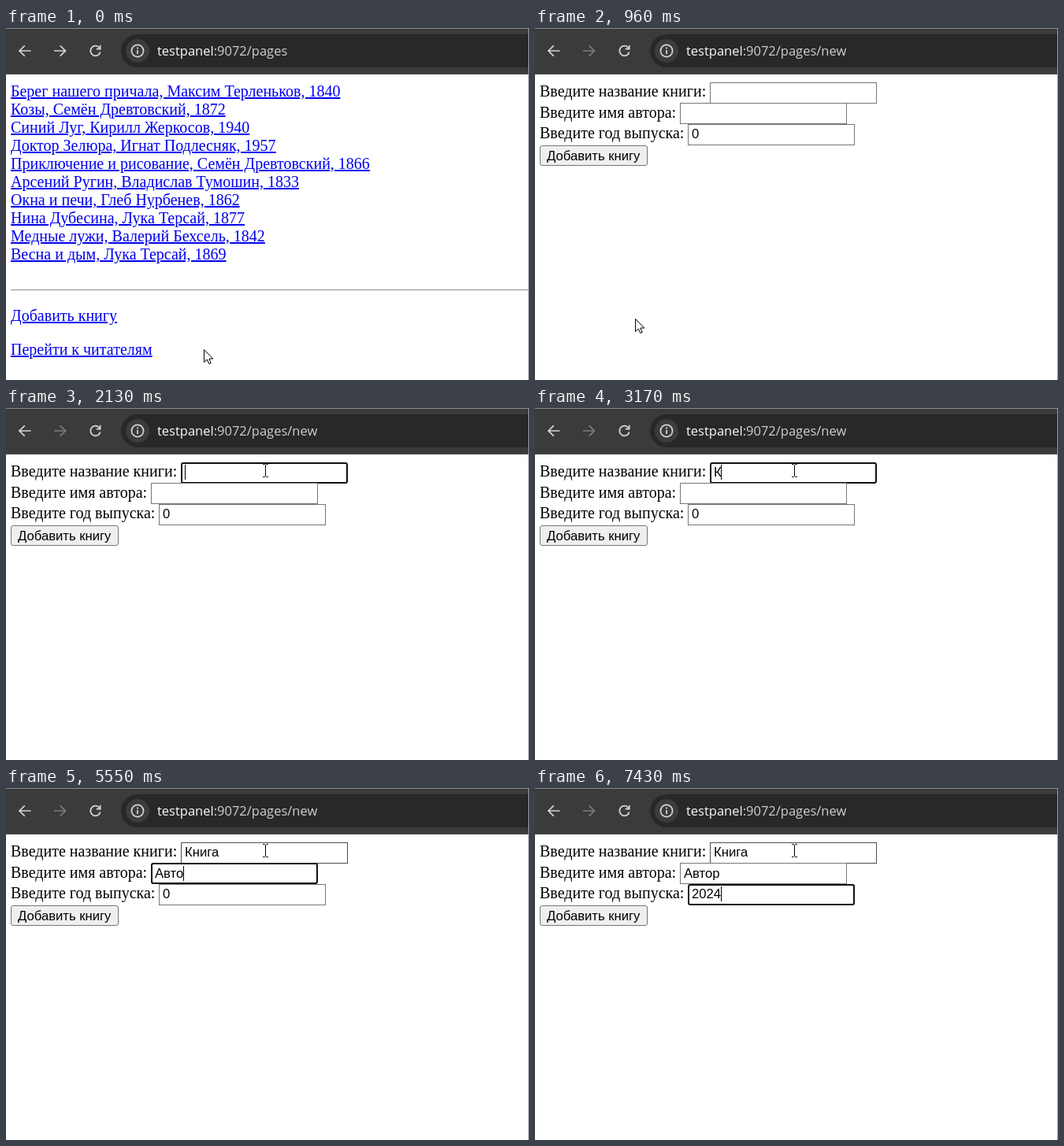
These frames come from a looping animation (664 px wide and 447 px high, 8 s). An HTML page:

```html
<!DOCTYPE html>
<html lang="ru">
<head>
<meta charset="utf-8">
<title>Каталог</title>
<style>
html, body { margin: 0; width: 100%; height: 100%; overflow: hidden; background: #fff; }
#stage { position: relative; width: 664px; height: 447px; overflow: hidden; background: #fff;
  font: 20px/23px "Liberation Serif", "Times New Roman", serif; color: #000; }
#stage * { position: absolute; white-space: pre; box-sizing: border-box; }
#bar { left: 0; top: 0; width: 664px; height: 59px; background: #3b3b3b;
  border-top: 1px solid #8c8c8c; border-bottom: 1px solid #4c4c4c; }
#icons { left: 0; top: 0; }
#url { left: 192px; top: 17px; font: 16.5px/24px "Open Sans", "Noto Sans", sans-serif; color: #cdcfd1; }
#stage #url span { position: static; }
#url .host { color: #fafafa; }
#edge { right: 0; top: 0; width: 1px; height: 447px; background: #9a9a9a; }
.link { left: 6px; color: #00e; text-decoration: underline; }
.link.active { color: #f00; }
#rule { left: 6px; top: 332px; width: 657px; height: 2px; background: #eee; border-top: 1px solid #9a9a9a; }
.field { width: 212px; height: 27px; border: 1px solid #767676; background: #fff; }
.field.hover { border-color: #4c4c4c; }
.field.focus { border: 2px solid #101010; border-radius: 3px; }
.value, #button { font: 16.667px/19px "Liberation Sans", Arial, sans-serif; }
.value.picked { background: #2f66cc; color: #fff; }
.caret { width: 1px; height: 19px; background: #000; }
#button { left: 6px; top: 149px; width: 137px; height: 26px; padding: 3px 0 0 8px;
  border: 1px solid #767676; border-radius: 3px; background: #efefef; }
#cursor { left: 0; top: 0; overflow: visible; }
</style>
</head>
<body>
<div id="stage">
  <div id="bar"></div>
  <svg id="icons" width="664" height="59" fill="none" stroke="#d6d6d6" stroke-width="1.7">
    <path d="M664 8H167a21 21 0 0 0 0 42H664z" fill="#282828" stroke="none"/>
    <circle cx="167" cy="29" r="15" fill="#3c3c3c" stroke="none"/>
    <path d="M31.500 29H17.500M23.800 22.300L17 29L23.800 35.700"/>
    <path id="forward" d="M61 29H75M68.700 22.300L75.500 29L68.700 35.700"/>
    <path d="M118.900 25.600A6.300 6.300 0 1 0 119.700 30.500M119.700 21.800V26.700H114.800"/>
    <circle cx="167" cy="29" r="7.600"/>
    <path d="M167 28V33M167 24.600V26.400"/>
  </svg>
  <div id="url"><span class="host">testpanel</span>:9072/pages<span id="tail">/new</span></div>
  <div id="list"><div id="rule"></div></div>
  <div id="form"><div id="button">Добавить книгу</div></div>
  <div id="edge"></div>
  <svg id="cursor" width="20" height="25" stroke="#000" stroke-linejoin="round">
    <path id="arrow" fill="#fff" d="M.5 .5V16.500L4.300 13L6.800 18.500L9.200 17.400L6.800 12H11.700Z"/>
    <g id="hand" fill="#fff">
      <path d="M5.500 14V2.500a1.500 1.500 0 0 1 3 0V8.500a1.500 1.500 0 0 1 3 .3a1.500 1.500 0 0 1 3 .6a1.400 1.400 0 0 1 2.800 .6V15c0 3-1.800 4-1.800 7.500H7C7 19 3.500 17 1 13.200c-1-1.600 1-2.800 2.300-1.400z"/>
      <path d="M8.500 8.500V12.500M11.500 9V12.800M14.500 9.600V13" fill="none"/>
    </g>
    <path id="beam" fill="none" d="M0 .5H2.500L3.500 1.500L4.500 .5H7M3.500 1.500V15.500M0 16.500H2.500L3.500 15.500L4.500 16.500H7"/>
  </svg>
</div>
<script>
const LOOP = 8000;
const $ = id => document.getElementById(id);

function add(parent, cls, left, top, text = "") {
  const el = document.createElement("div");
  el.className = cls;
  el.style.left = left + "px";
  el.style.top = top + "px";
  el.textContent = text;
  parent.append(el);
  return el;
}

const books = [
  "Берег нашего причала, Максим Терленьков, 1840",
  "Козы, Семён Древтовский, 1872",
  "Синий Луг, Кирилл Жеркосов, 1940",
  "Доктор Зелюра, Игнат Подлесняк, 1957",
  "Приключение и рисование, Семён Древтовский, 1866",
  "Арсений Ругин, Владислав Тумошин, 1833",
  "Окна и печи, Глеб Нурбенев, 1862",
  "Нина Дубесина, Лука Терсай, 1877",
  "Медные лужи, Валерий Бехсель, 1842",
  "Весна и дым, Лука Терсай, 1869"
];
books.forEach((text, i) => add($("list"), "link", 6, 69 + 23 * i, text));
const addLink = add($("list"), "link", 6, 354, "Добавить книгу");
add($("list"), "link", 6, 397, "Перейти к читателям");

// label, label top, field left, field top, text top
const fields = [
  ["Введите название книги:", 69, 222, 69, 72],
  ["Введите имя автора:", 96, 184, 95, 99],
  ["Введите год выпуска:", 122, 194, 122, 125]
].map(([label, labelTop, x, y, textTop]) => {
  add($("form"), "", 6, labelTop, label);
  const box = add($("form"), "field", x, y);
  const value = add($("form"), "value", x + 5, textTop);
  const caret = add($("form"), "caret", x + 5, textTop);
  return { x, box, value, caret };
});

// time, shape, left, top
const moves = [
  [0, "arrow", 251, 408],
  [120, "arrow", 189, 389],
  [270, "arrow", 153, 377],
  [400, "hand", 126, 371],
  [530, "hand", 121, 369],
  [960, "arrow", 127, 369],
  [1360, "arrow", 270, 190],
  [1490, "beam", 328, 89],
  [1630, "beam", 326, 71]
];

// time, hovered field, focused field, caret shown, title, author, year
const steps = [
  [0, -1, -1, 0, "", "", "0"],
  [1490, 1, -1, 0, "", "", "0"],
  [1630, 0, -1, 0, "", "", "0"],
  [2130, 0, 0, 1, "", "", "0"],
  [2640, 0, 0, 0, "", "", "0"],
  [3170, 0, 0, 1, "К", "", "0"],
  [3550, 0, 0, 1, "Кни", "", "0"],
  [3830, 0, 0, 1, "Книг", "", "0"],
  [3960, 0, 0, 1, "Книга", "", "0"],
  [4360, 0, 1, 1, "Книга", "", "0"],
  [4860, 0, 1, 1, "Книга", "А", "0"],
  [4990, 0, 1, 1, "Книга", "Ав", "0"],
  [5420, 0, 1, 1, "Книга", "Авт", "0"],
  [5550, 0, 1, 1, "Книга", "Авто", "0"],
  [5690, 0, 1, 1, "Книга", "Автор", "0"],
  [6220, 0, 1, 0, "Книга", "Автор", "0"],
  [6370, 0, 2, 0, "Книга", "Автор", "0"],
  [7150, 0, 2, 1, "Книга", "Автор", "20"],
  [7430, 0, 2, 1, "Книга", "Автор", "2024"]
];

const at = (table, t) => table.findLast(row => row[0] <= t);
const show = (el, on) => { el.style.display = on ? "" : "none"; };

function drawCursor(t) {
  const [, shape, x, y] = at(moves, t);
  for (const name of ["arrow", "hand", "beam"]) show($(name), name === shape);
  $("cursor").style.transform = `translate(${x}px, ${y}px)`;
}

function drawForm(t) {
  const [, hover, focus, caretOn, ...texts] = at(steps, t);
  fields.forEach((f, i) => {
    const focused = i === focus;
    f.box.classList.toggle("hover", i === hover);
    f.box.classList.toggle("focus", focused);
    f.value.textContent = texts[i];
    f.value.classList.toggle("picked", focused && i === 2 && texts[i] === "0");
    show(f.caret, focused && caretOn);
    f.caret.style.left = Math.floor(f.x + 5 + f.value.getBoundingClientRect().width) + "px";
  });
}

function draw() {
  const t = performance.now() % LOOP;
  const onForm = t >= 960;
  show($("list"), !onForm);
  show($("form"), onForm);
  show($("tail"), onForm);
  $("forward").setAttribute("stroke", onForm ? "#7c7c7c" : "#d6d6d6");
  addLink.classList.toggle("active", t >= 810);
  drawForm(t);
  drawCursor(t);
  requestAnimationFrame(draw);
}
draw();
</script>
</body>
</html>
```
